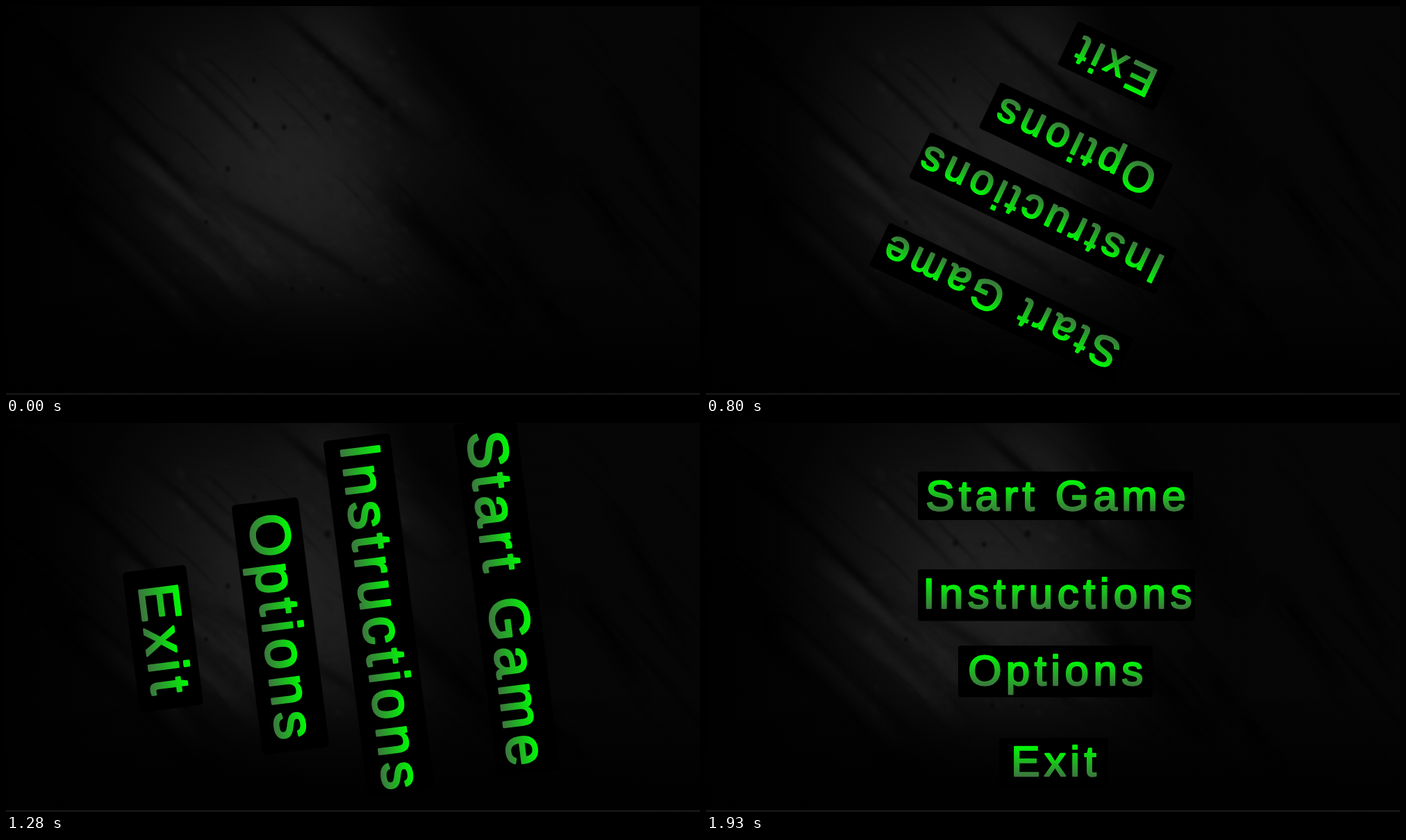
These frames come from a looping animation (999x561 px, 2.47 s). An HTML page with a canvas:

```html
<!DOCTYPE html>
<html lang="en">
<head>
<meta charset="utf-8">
<title>Menu</title>
<style>
  html, body { margin: 0; width: 100%; height: 100%; overflow: hidden; background: #000; }
  canvas { display: block; }
</style>
</head>
<body>
<canvas id="stage" width="999" height="561"></canvas>
<script>
const W = 999, H = 561, FLOOR = 558, LOOP = 2470;
const FONT = '62px "Liberation Sans", Arial, sans-serif';
const SPACING = 6.4, WEIGHT = 2.4;
const PIVOT = { x: 500.3, y: 276 };

const ctx = document.getElementById('stage').getContext('2d');

// text, left ink edge, baseline, box x, y, width, height
const ITEMS = [
  ['Start Game', 317, 126, 305, 70, 396, 70],
  ['Instructions', 316, 267, 305, 211, 399, 74.5],
  ['Options', 378, 378, 363, 321, 280, 74.5],
  ['Exit', 443, 509, 422, 454, 157, 71]
];

// time in ms, progress of the spin
const PACE = [
  [160, 0.14], [320, 0.2185], [640, 0.3755], [960, 0.53],
  [1280, 0.689], [1610, 0.847], [1930, 1]
];

const smooth = v => v * v * (3 - 2 * v);

function progress(t) {
  let i = 1;
  while (i < PACE.length - 1 && t > PACE[i][0]) i++;
  const [t0, a] = PACE[i - 1], [t1, b] = PACE[i];
  return Math.min(1, a + (b - a) * (t - t0) / (t1 - t0));
}

// Grows to 1.3 during the first two thirds, then settles at 1
function zoom(u) {
  const peak = 2 / 3;
  return u < peak
    ? 1.3 * smooth(u / peak)
    : 1.3 - 0.3 * smooth((u - peak) / (1 - peak));
}

// Holds each pose for one 80 ms tick
function tick(t) {
  const base = t < 1370 ? 0 : 1370;
  return Math.min(1930, base + Math.floor((t - base) / 80) * 80);
}

function seeded(seed) {
  return () => (seed = (seed * 16807) % 2147483647) / 2147483647;
}

function makeBackdrop() {
  const c = document.createElement('canvas');
  c.width = W;
  c.height = H;
  const g = c.getContext('2d');
  const rand = seeded(71);

  const base = g.createLinearGradient(0, 0, W, 0);
  base.addColorStop(0, '#010101');
  base.addColorStop(0.2, '#040404');
  base.addColorStop(1, '#060606');
  g.fillStyle = base;
  g.fillRect(0, 0, W, H);

  function glow(x, y, rx, ry, turn, level, alpha) {
    g.save();
    g.translate(x, y);
    g.rotate(turn);
    g.scale(rx, ry);
    const r = g.createRadialGradient(0, 0, 0, 0, 0, 1);
    for (let i = 0; i <= 8; i++) {
      const a = alpha * (1 - smooth(i / 8));
      r.addColorStop(i / 8, `rgba(${level},${level},${level},${a})`);
    }
    g.fillStyle = r;
    g.fillRect(-1, -1, 2, 2);
    g.restore();
  }

  function streak(x1, y1, x2, y2, width, level, alpha, blur) {
    const l = g.createLinearGradient(x1, y1, x2, y2);
    const col = a => `rgba(${level},${level},${level},${a})`;
    l.addColorStop(0, col(0));
    l.addColorStop(0.3, col(alpha));
    l.addColorStop(0.7, col(alpha));
    l.addColorStop(1, col(0));
    g.filter = `blur(${blur}px)`;
    g.strokeStyle = l;
    g.lineWidth = width;
    g.beginPath();
    g.moveTo(x1, y1);
    g.quadraticCurveTo((x1 + x2) / 2 + 6, (y1 + y2) / 2 - 6, x2, y2);
    g.stroke();
    g.filter = 'none';
  }

  glow(405, 235, 370, 300, 0.7, 33, 0.92);
  glow(470, 40, 150, 120, 0.8, 34, 0.45);
  glow(430, 240, 190, 140, 0.6, 36, 0.35);
  glow(640, 330, 110, 260, -0.7, 0, 0.35);

  const light = [
    [150, 190, 410, 400, 24, 0.4, 4], [180, 270, 380, 450, 22, 0.25, 5],
    [90, 280, 300, 490, 26, 0.18, 6], [430, 10, 640, 190, 30, 0.2, 9]
  ];
  for (const [x1, y1, x2, y2, w, a, b] of light) streak(x1, y1, x2, y2, w, 44, a, b);

  const dark = [
    [370, -10, 600, 200, 12, 0.65, 4], [0, 10, 350, 355, 12, 0.6, 4],
    [190, 50, 370, 220, 7, 0.45, 3], [270, 250, 570, 430, 14, 0.4, 5],
    [530, 250, 720, 450, 28, 0.6, 8], [550, -20, 780, 260, 40, 0.45, 11],
    [0, 200, 300, 510, 24, 0.45, 8], [870, 120, 990, 350, 12, 0.6, 4],
    [810, 220, 920, 400, 16, 0.5, 5], [700, 330, 830, 510, 20, 0.5, 6]
  ];
  for (const [x1, y1, x2, y2, w, a, b] of dark) streak(x1, y1, x2, y2, w, 0, a, b);

  // Fine diagonal scratches
  for (let i = 0; i < 46; i++) {
    const x = rand() * W, y = rand() * 470, n = 50 + rand() * 110;
    streak(x, y, x + n, y + n * (0.85 + x / 2500), 1 + rand() * 4, 0, 0.2, 1);
  }

  // Mottled wall
  for (let i = 0; i < 500; i++) {
    const x = 230 + rand() * 350, y = 60 + rand() * 360, r = 2 + rand() * 9;
    glow(x, y, r * 1.4, r, 0.7, rand() < 0.5 ? 8 : 44, 0.1);
  }
  const spots = [
    [359, 173, 7], [400, 175, 6], [463, 160, 8], [319, 235, 6], [516, 395, 6],
    [412, 408, 5], [455, 408, 5], [357, 107, 6], [288, 312, 5]
  ];
  for (const [x, y, r] of spots) glow(x, y, r, r * 1.2, 0, 4, 0.65);

  const shade = g.createLinearGradient(0, 380, 0, 545);
  shade.addColorStop(0, 'rgba(0,0,0,0)');
  shade.addColorStop(1, 'rgba(0,0,0,0.9)');
  g.fillStyle = shade;
  g.fillRect(0, 380, W, FLOOR - 380);
  g.fillStyle = '#141414';
  g.fillRect(0, FLOOR, W, H - FLOOR);
  return c;
}

// Every letter carries its own top-to-bottom gradient
function drawWord(text, left, base) {
  let x = left + WEIGHT / 2 + ctx.measureText(text[0]).actualBoundingBoxLeft;
  for (const ch of text) {
    const m = ctx.measureText(ch);
    const g = ctx.createLinearGradient(
      0, base - m.actualBoundingBoxAscent - 1, 0, base + m.actualBoundingBoxDescent + 1);
    g.addColorStop(0, '#00fa04');
    g.addColorStop(1, '#3d743f');
    ctx.fillStyle = ctx.strokeStyle = g;
    ctx.fillText(ch, x, base);
    ctx.strokeText(ch, x, base);
    x += m.width + SPACING;
  }
}

function drawMenu(u) {
  const s = zoom(u);
  ctx.save();
  ctx.beginPath();
  ctx.rect(0, 0, W, FLOOR);
  ctx.clip();
  ctx.translate(PIVOT.x, PIVOT.y);
  ctx.rotate(-2 * Math.PI * smooth(u));
  ctx.scale(s, s);
  ctx.translate(-PIVOT.x, -PIVOT.y);
  ctx.font = FONT;
  ctx.lineWidth = WEIGHT;
  ctx.lineJoin = 'round';
  for (const [text, left, base, x, y, w, h] of ITEMS) {
    ctx.fillStyle = '#000';
    ctx.beginPath();
    ctx.roundRect(x, y, w, h, 4);
    ctx.fill();
    drawWord(text, left, base);
  }
  ctx.restore();
}

const backdrop = makeBackdrop();
const start = performance.now();

function frame() {
  const t = (performance.now() - start) % LOOP;
  ctx.drawImage(backdrop, 0, 0);
  if (t >= 160) drawMenu(progress(tick(t)));
  requestAnimationFrame(frame);
}
frame();
</script>
</body>
</html>
```
